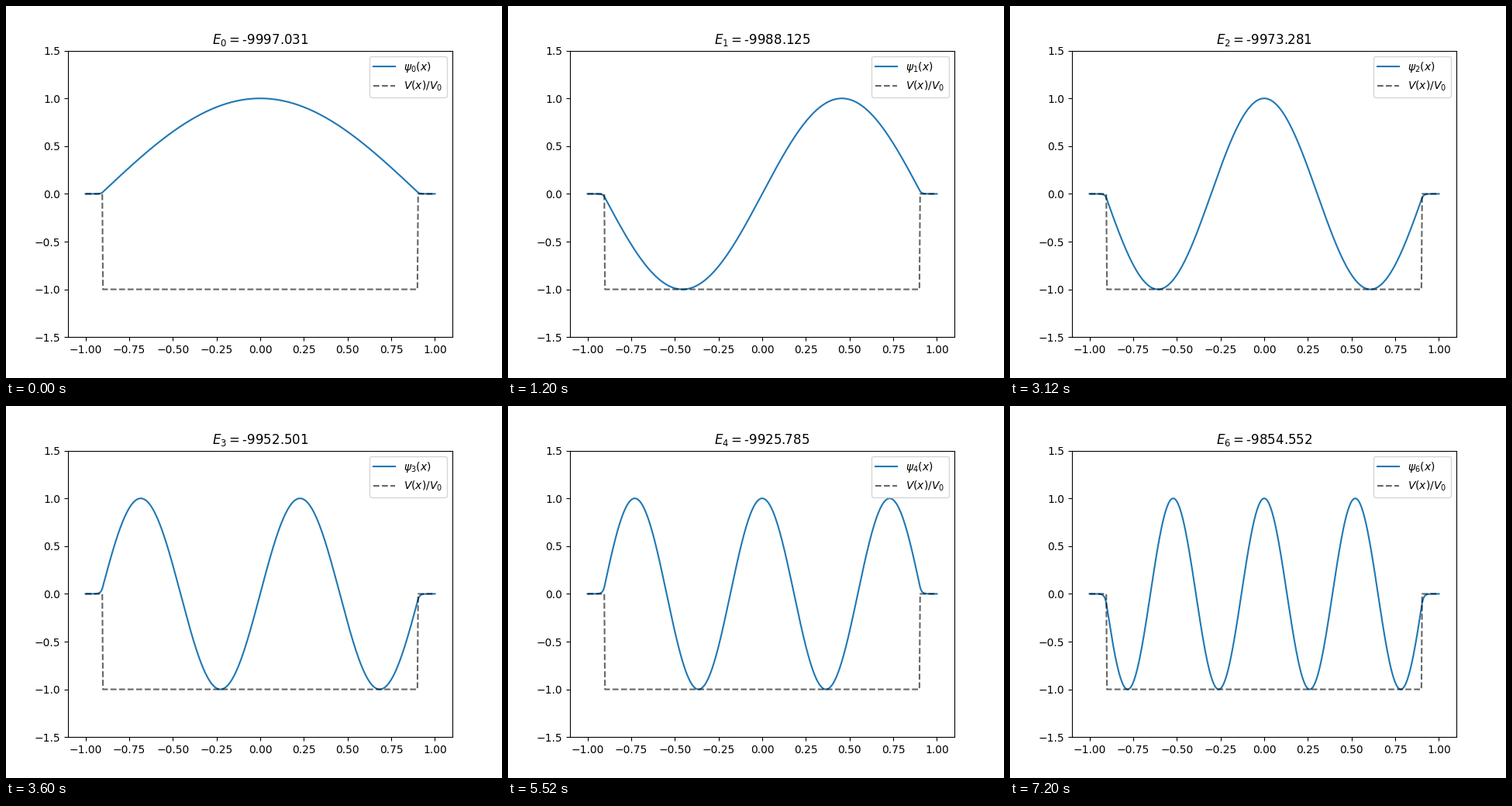
Write a matplotlib script that moves like this. It is 640x480 px and loops after 8000 ms.

```python
import numpy as np
import matplotlib.pyplot as plt
from matplotlib.animation import FuncAnimation

DEPTH = 10000
EDGE = 0.9017       # effective half width of the well
STEP_MS = 400
FRAMES = 20
HOLD = 3            # steps for which each state stays
ENERGIES = [-9997.031, -9988.125, -9973.281, -9952.501,
            -9925.785, -9893.135, -9854.552]

x = np.linspace(-1, 1, 500)


def state(n):
    """Bound state n of the finite square well, with peak value 1."""
    k = np.sqrt(DEPTH + ENERGIES[n])
    decay = np.sqrt(-ENERGIES[n])
    wave = np.sin if n % 2 else np.cos
    inside = wave(k * np.clip(x, -EDGE, EDGE))
    return inside * np.exp(-decay * np.maximum(np.abs(x) - EDGE, 0))


fig, ax = plt.subplots(figsize=(6.4, 4.8), dpi=100)
psi_line, = ax.plot(x, state(0), label=r"$\psi_0(x)$")
ax.plot(x, np.where(np.abs(x) < 0.9, -1.0, 0.0), "k--", alpha=0.6,
        label=r"$V(x)/V_0$")
ax.set_ylim(-1.5, 1.5)
title = ax.set_title("")
psi_label = ax.legend(loc="upper right").get_texts()[0]


def draw(i):
    n = i // HOLD
    psi_line.set_ydata(state(n))
    psi_label.set_text(rf"$\psi_{n}(x)$")
    title.set_text(f"$E_{n} = $" + f"{ENERGIES[n]:.3f}")
    return psi_line, psi_label, title


anim = FuncAnimation(fig, draw, frames=FRAMES, interval=STEP_MS,
                     repeat=True, repeat_delay=0, blit=False)
plt.show()
```
